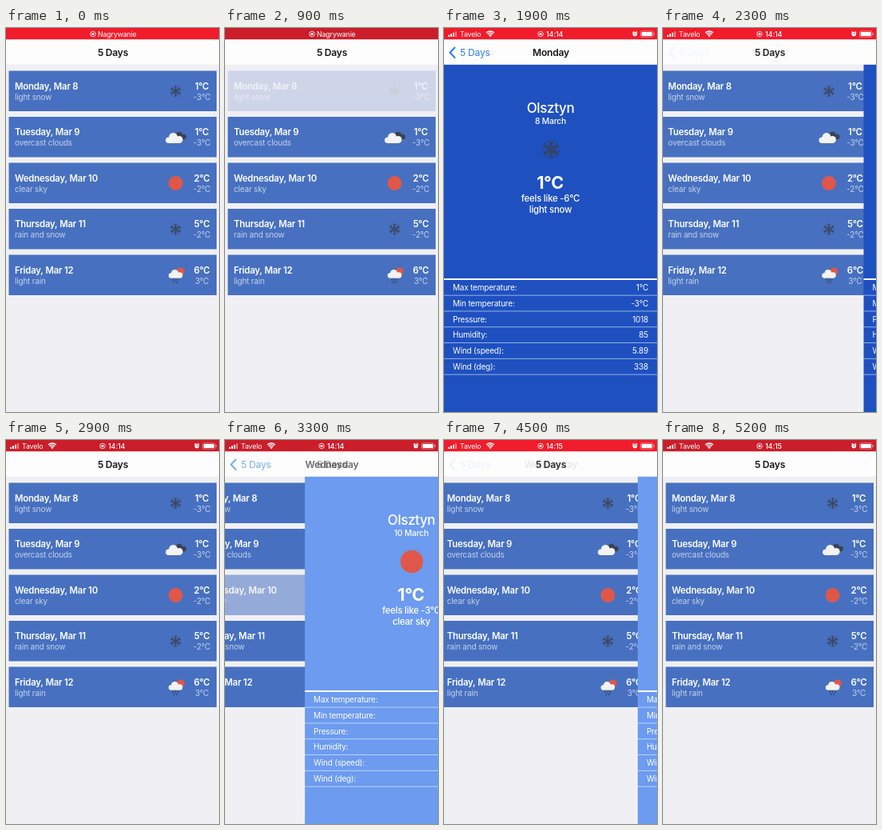
These frames come from a looping animation (267 px wide and 480 px high, 5300 ms). An HTML page with a canvas:

```html
<!DOCTYPE html>
<html lang="en">
<head>
<meta charset="utf-8">
<title>5 Days</title>
<style>
html, body { margin: 0; width: 100%; height: 100%; overflow: hidden; background: #f0eff4; }
canvas { display: block; width: 267px; height: 480px; }
</style>
</head>
<body>
<canvas id="stage"></canvas>
<script>
const W = 267, H = 480, LOOP = 5300, STEP = 100, STATUS = 14.24, HEADER = 45.6;
const BG = '#f0eff4', CARD = '#4770c0', DARK = '#3a4254', SUN = '#e0574a', CLOUD = '#f3f3f4';
const canvas = document.getElementById('stage');
const ratio = window.devicePixelRatio || 1;
canvas.width = W * ratio;
canvas.height = H * ratio;
const ctx = canvas.getContext('2d');

const days = [
  { name: 'Monday, Mar 8', sky: 'light snow', icon: snow, hi: '1°C', lo: '-3°C' },
  { name: 'Tuesday, Mar 9', sky: 'overcast clouds', icon: overcast, hi: '1°C', lo: '-3°C' },
  { name: 'Wednesday, Mar 10', sky: 'clear sky', icon: sun, hi: '2°C', lo: '-2°C' },
  { name: 'Thursday, Mar 11', sky: 'rain and snow', icon: snow, hi: '5°C', lo: '-2°C' },
  { name: 'Friday, Mar 12', sky: 'light rain', icon: shower, hi: '6°C', lo: '3°C' }
];
const labels = ['Max temperature:', 'Min temperature:', 'Pressure:', 'Humidity:', 'Wind (speed):', 'Wind (deg):'];
const visits = [
  { row: 0, press: 720, push: 1000, back: 1890, pop: 2050, title: 'Monday', date: '8 March',
    color: '#1e50c0', icon: snow, feels: '-6°C', sky: 'light snow',
    values: ['1°C', '-3°C', '1018', '85', '5.89', '338'] },
  { row: 2, press: 2920, push: 3184, back: 4120, pop: 4280, title: 'Wednesday', date: '10 March',
    color: '#6c9bf0', icon: sun, feels: '-3°C', sky: 'clear sky',
    values: ['2°C', '-2°C', '1023', '80', '1.62', '252'] }
];

const clamp = v => Math.max(0, Math.min(1, v));
const mix = (a, b, k) => a + (b - a) * k;
const easeInOut = v => v < .5 ? 2 * v * v : 1 - 2 * (1 - v) ** 2;

// Critically damped spring from 0 to 1.
function spring(ms) {
  if (ms <= 0) return 0;
  const u = 18.26 * ms / 1000;
  return u > 9 ? 1 : 1 - Math.exp(-u) * (1 + u);
}

// Pressed items drop to 20% opacity, then recover; returns the lost opacity.
function pressFade(t, press, release) {
  const down = easeInOut(clamp((t - press) / 150));
  const up = easeInOut(clamp((t - release) / 250));
  return .8 * down * (1 - up);
}

function text(str, x, y, size, { weight = 400, align = 'left', color = '#fff' } = {}) {
  ctx.font = `${weight} ${size}px Inter, sans-serif`;
  ctx.letterSpacing = `${-.02 * size}px`;
  ctx.textAlign = align;
  ctx.fillStyle = color;
  ctx.fillText(str, x, y);
}

function rect(x, y, w, h, color) {
  ctx.fillStyle = color;
  ctx.fillRect(x, y, w, h);
}

function disc(x, y, r, color) {
  ctx.fillStyle = color;
  ctx.beginPath();
  ctx.arc(x, y, r, 0, 7);
  ctx.fill();
}

function line(points, width, color) {
  ctx.strokeStyle = color;
  ctx.lineWidth = width;
  ctx.beginPath();
  points.forEach(([x, y], i) => i ? ctx.lineTo(x, y) : ctx.moveTo(x, y));
  ctx.stroke();
}

function at(x, y, scale, draw) {
  ctx.save();
  ctx.translate(x, y);
  ctx.scale(scale, scale);
  draw();
  ctx.restore();
}

function snow() {
  ctx.lineCap = 'round';
  for (let i = 0; i < 6; i++) {
    line([[0, 0], [0, -6.7]], 1, DARK);
    line([[-2, -6.2], [0, -4.6], [2, -6.2]], .9, DARK);
    line([[-1.6, -2.8], [0, -3.2], [1.6, -2.8]], .8, DARK);
    ctx.rotate(Math.PI / 3);
  }
}

function sun() {
  ctx.fillStyle = SUN;
  ctx.beginPath();
  for (let i = 0; i < 48; i++) {
    const a = i * Math.PI / 24, r = i % 2 ? 8.6 : 9.2;
    ctx.lineTo(r * Math.cos(a), r * Math.sin(a));
  }
  ctx.fill();
}

// Cloud about 22 wide, resting on y = 0.
function cloud(color) {
  disc(-7.2, -3.8, 3.8, color);
  disc(-1.5, -7.6, 5.4, color);
  disc(6, -4.5, 4.5, color);
  rect(-7.2, -5, 13.4, 5, color);
}

function overcast() {
  at(5.6, 2.8, .74, () => cloud(DARK));
  at(-1.5, 7.5, 1, () => cloud(CLOUD));
}

function shower() {
  disc(6.2, -4.6, 5, SUN);
  at(.2, 3.6, .82, () => cloud(CLOUD));
  ctx.lineCap = 'round';
  [[-3, 5], [.5, 5], [4, 5], [-1.5, 8], [2, 8]].forEach(([x, y]) =>
    line([[x, y], [x - .8, y + 1.7]], 1.1, DARK));
}

function drawList(t) {
  rect(0, HEADER, W * 1.3, H - HEADER, BG);
  days.forEach((day, i) => {
    const y = 53.5 + i * 57.5;
    rect(3.5, y, 260.5, 50.5, CARD);
    text(day.name, 11, y + 23.3, 11.4, { weight: 600 });
    text(day.sky, 11, y + 36, 10, { color: '#c5d1ea' });
    at(212.6, y + 25.5, 1, day.icon);
    text(day.hi, 245.5, y + 23.3, 11.4, { weight: 600, align: 'center' });
    text(day.lo, 245.5, y + 36, 10, { align: 'center', color: '#c5d1ea' });
    const visit = visits.find(v => v.row === i);
    if (!visit) return;
    ctx.globalAlpha = pressFade(t, visit.press, visit.push);
    rect(3, y - .5, 261.5, 51.5, BG);
    ctx.globalAlpha = 1;
  });
}

function drawDetail(visit) {
  const mid = { weight: 500, align: 'center' };
  rect(0, HEADER, W, H - HEADER, visit.color);
  text('Olsztyn', 133.5, 106.4, 17, mid);
  text(visit.date, 133.5, 120.3, 10.3, mid);
  at(134, 152, 1.6, visit.icon);
  text('1°C', 133, 201, 21.6, { weight: 700, align: 'center' });
  text('feels like ' + visit.feels, 133.5, 217, 11.4, mid);
  text(visit.sky, 133.5, 231, 11.4, mid);
  rect(0, 313, W, 2, '#fff');
  labels.forEach((label, i) => {
    const y = 328 + i * 19.8;
    text(label, 11, y, 10);
    text(visit.values[i], 256, y, 10, { align: 'right' });
    rect(0, y + 5.7, W, .9, 'rgba(255,255,255,.6)');
  });
}

function drawHeader(t, visit, p) {
  rect(0, 0, W, HEADER, '#fdfdfd');
  const title = { weight: 600, align: 'center', color: '#161618' };
  ctx.globalAlpha = 1 - p;
  text('5 Days', 134, 35, 12.1, title);
  if (p > 0) {
    ctx.globalAlpha = p;
    text(visit.title, 134, 35, 12.1, title);
    ctx.globalAlpha = p * (1 - pressFade(t, visit.back, visit.pop));
    ctx.lineCap = 'round';
    ctx.lineJoin = 'round';
    line([[13.5, 24.5], [7.5, 30.7], [13.5, 37]], 2, '#2a7fe6');
    text('5 Days', 20, 35, 12.1, { color: '#2a7fe6' });
  }
  ctx.globalAlpha = 1;
}

function recordMark(x) {
  ctx.strokeStyle = '#fff';
  ctx.lineWidth = .8;
  ctx.beginPath();
  ctx.arc(x, 7.5, 3.3, 0, 7);
  ctx.stroke();
  disc(x, 7.5, 1.6, '#fff');
}

function drawStatus(t) {
  const wave = Math.cos((t - 100) / 2100 * 2 * Math.PI);
  const glow = clamp(.5 + 1.2 * wave);
  rect(0, 0, W, STATUS, `rgb(${mix(203, 240, glow)},${mix(29, 28, glow)},${mix(42, 43, glow)})`);
  if (t < 1300) {
    recordMark(109);
    text('Nagrywanie', 115, 10.8, 8.9);
    return;
  }
  for (let i = 0; i < 4; i++) {
    const h = 2.2 + i * 1.5;
    rect(5 + i * 3, 11 - h, 2, h, i < 3 ? '#fff' : 'rgba(255,255,255,.45)');
  }
  text('Tavelo', 20, 10.8, 8.9);
  ctx.lineCap = 'butt';
  ctx.strokeStyle = '#fff';
  ctx.lineWidth = 1.5;
  [2.4, 4.7, 7].forEach(r => {
    ctx.beginPath();
    ctx.arc(58, 11, r, -Math.PI * .75, -Math.PI * .25);
    ctx.stroke();
  });
  disc(58, 10.3, .9, '#fff');
  recordMark(121);
  text(t < 3800 ? '14:14' : '14:15', 128, 10.8, 9.1, { weight: 500 });
  disc(239.3, 7.5, 2.8, '#fff');
  line([[236.2, 5.5], [238, 4]], 1, '#fff');
  line([[240.6, 4], [242.4, 5.5]], 1, '#fff');
  line([[239.3, 5.8], [239.3, 7.7], [240.6, 7.7]], .7, '#d02030');
  ctx.strokeStyle = 'rgba(255,255,255,.6)';
  ctx.lineWidth = .7;
  ctx.beginPath();
  ctx.roundRect(246.5, 3.8, 15.5, 7.4, 2);
  ctx.stroke();
  ctx.fillStyle = '#fff';
  ctx.beginPath();
  ctx.roundRect(247.7, 5, 13.1, 5, 1);
  ctx.fill();
  rect(262.8, 6.2, 1, 2.6, 'rgba(255,255,255,.7)');
}

function draw(t) {
  ctx.setTransform(ratio, 0, 0, ratio, 0, 0);
  rect(0, 0, W, H, BG);
  const visit = t < 2800 ? visits[0] : visits[1];
  const p = spring(t - visit.push) * (1 - spring(t - visit.pop));
  at(-.3 * W * p, 0, 1, () => drawList(t));
  if (p > 0) at(W * (1 - p), 0, 1, () => drawDetail(visit));
  drawHeader(t, visit, p);
  drawStatus(t);
}

const start = performance.now();
function tick() {
  const t = (performance.now() - start) % LOOP;
  draw(Math.floor(t / STEP) * STEP);
  requestAnimationFrame(tick);
}
tick();
</script>
</body>
</html>
```
